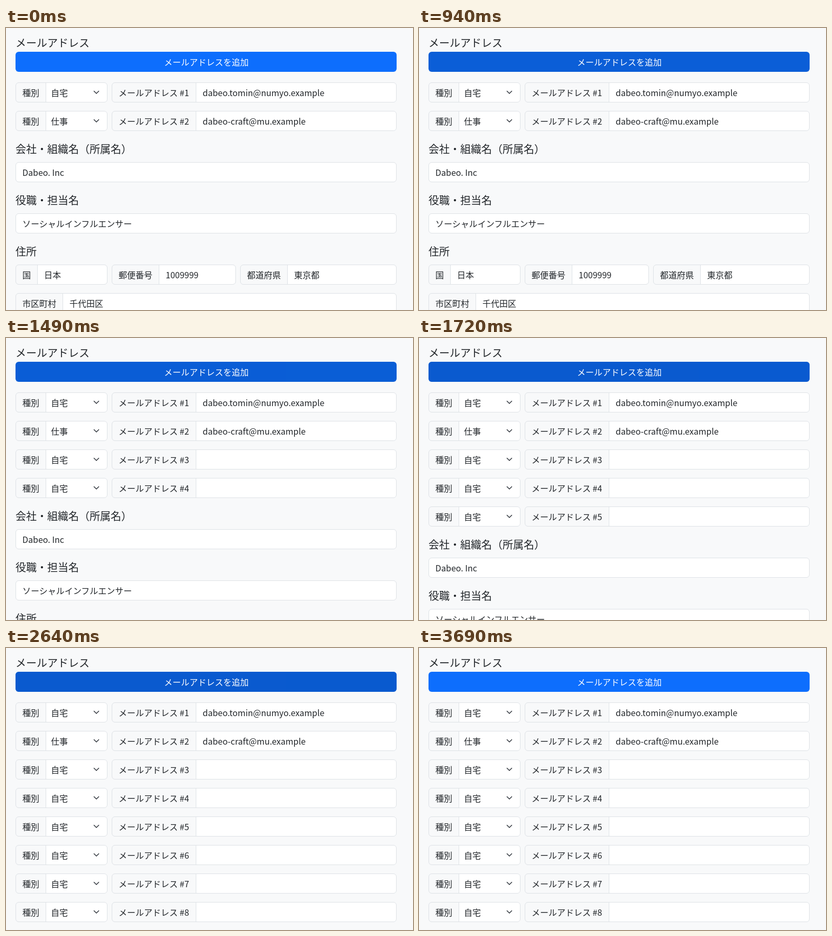
An HTML page for the animation above (4.41 s loop, 770 by 534 pixels).

```html
<!DOCTYPE html>
<html lang="ja">
<head>
<meta charset="utf-8">
<title>メールアドレス</title>
<style>
  :root {
    --page: #f8f9fa;
    --field: #fff;
    --line: #dee2e6;
    --ink: #212529;
    --blue: #0d6efd;
    --hover: #0b5ed7;
    --active: #0a58ca;
  }
  html, body { margin: 0; width: 100%; height: 100%; overflow: hidden; background: var(--page); }
  svg { display: block; width: 770px; height: 534px; }
  text { font: 16px "Noto Sans CJK JP", "Noto Sans CJK", "Noto Sans", sans-serif; fill: var(--ink); }
  .title { font-size: 20px; }
  .page, .label { fill: var(--page); }
  .field { fill: var(--field); }
  .line { fill: none; stroke: var(--line); }
  .arrow { fill: none; stroke: #343a40; stroke-width: 1.5; stroke-linecap: round; stroke-linejoin: round; }
  .button { fill: var(--blue); animation: hover 4410ms infinite; }
  .clicks { animation: clicks 4410ms step-end infinite; }
  /* 24 presses would fill the loop; .clicks shows twelve of them */
  .press { fill: var(--active); animation: press 183.75ms -146ms infinite; }
  .caption { fill: #fff; text-anchor: middle; }
  #rest { animation: push 4410ms infinite; }

  @keyframes hover {
    0%, 16.55% { fill: var(--blue); animation-timing-function: ease; }
    21.32%, 83.66% { fill: var(--hover); animation-timing-function: step-end; }
    83.67%, 100% { fill: var(--blue); }
  }
  @keyframes clicks {
    0% { opacity: 0; }
    25.85% { opacity: 1; }
    75.85%, 100% { opacity: 0; }
  }
  @keyframes press {
    0%, 100% { opacity: 0; }
    50% { opacity: 1; }
  }
  /* each click adds one 54px row */
  @keyframes push {
    0%, 23.77% { transform: translateY(0); animation-timing-function: steps(6, end); }
    48.77%, 100% { transform: translateY(324px); }
  }
</style>
</head>
<body>
<svg viewBox="0 0 770 534">
  <rect class="page" width="770" height="534"/>
  <text class="title" x="18" y="36">メールアドレス</text>
  <rect class="button" x="18" y="45" width="721" height="38" rx="6"/>
  <g class="clicks"><rect class="press" x="18" y="45" width="721" height="38" rx="6"/></g>
  <text class="caption" x="379" y="71">メールアドレスを追加</text>
  <g id="mails"></g>
  <g id="rest"></g>
</svg>
<script>
  const text = (x, y, s, cls = '') => `<text class="${cls}" x="${x}" y="${y}">${s}</text>`;

  const box = (x, y, right) =>
    `x="${x + .5}" y="${y + .5}" width="${right - x - 1}" height="37" rx="5.5"`;

  // A bordered input, optionally with a label cell ending at `split`
  function input(x, right, y, value, label, split) {
    const frame = box(x, y, right);
    let out = `<rect class="field" ${frame}/>`;
    if (label) {
      out += `<path class="label" d="M${split} ${y}H${x + 6}q-6 0-6 6v26q0 6 6 6H${split}z"/>` +
        `<path class="line" d="M${split + .5} ${y}v38"/>` + text(x + 13, y + 26, label);
    }
    const left = label ? split + 13 : x + 13;
    return out + `<rect class="line" ${frame}/>` + text(left, y + 26, value);
  }

  function mailRow(i, kind, address) {
    const y = 103 + i * 54;
    return input(18, 192, y, '', '種別', 75) + text(85, y + 26, kind) +
      `<path class="arrow" d="M166.5 ${y + 16.5}l4.5 4.5 4.5-4.5"/>` +
      input(200, 739, y, address, `メールアドレス #${i + 1}`, 359);
  }

  const filled = [['自宅', 'dabeo.tomin@numyo.example'], ['仕事', 'dabeo-craft@mu.example']];
  let rows = '';
  for (let i = 0; i < 8; i++) rows += mailRow(i, ...(filled[i] || ['自宅', '']));
  document.getElementById('mails').innerHTML = rows;

  // Opaque block that covers the rows not added yet
  document.getElementById('rest').innerHTML =
    '<rect class="page" y="202" width="770" height="400"/>' +
    text(18, 237, '会社・組織名（所属名）', 'title') +
    input(18, 739, 254, 'Dabeo. Inc') +
    text(18, 334, '役職・担当名', 'title') +
    input(18, 739, 351, 'ソーシャルインフルエンサー') +
    text(18, 431, '住所', 'title') +
    input(18, 192, 448, '日本', '国', 59) +
    input(200, 435, 448, '1009999', '郵便番号', 289) +
    input(443, 739, 448, '東京都', '都道府県', 532) +
    input(18, 739, 502, '千代田区', '市区町村', 107);
</script>
</body>
</html>
```
